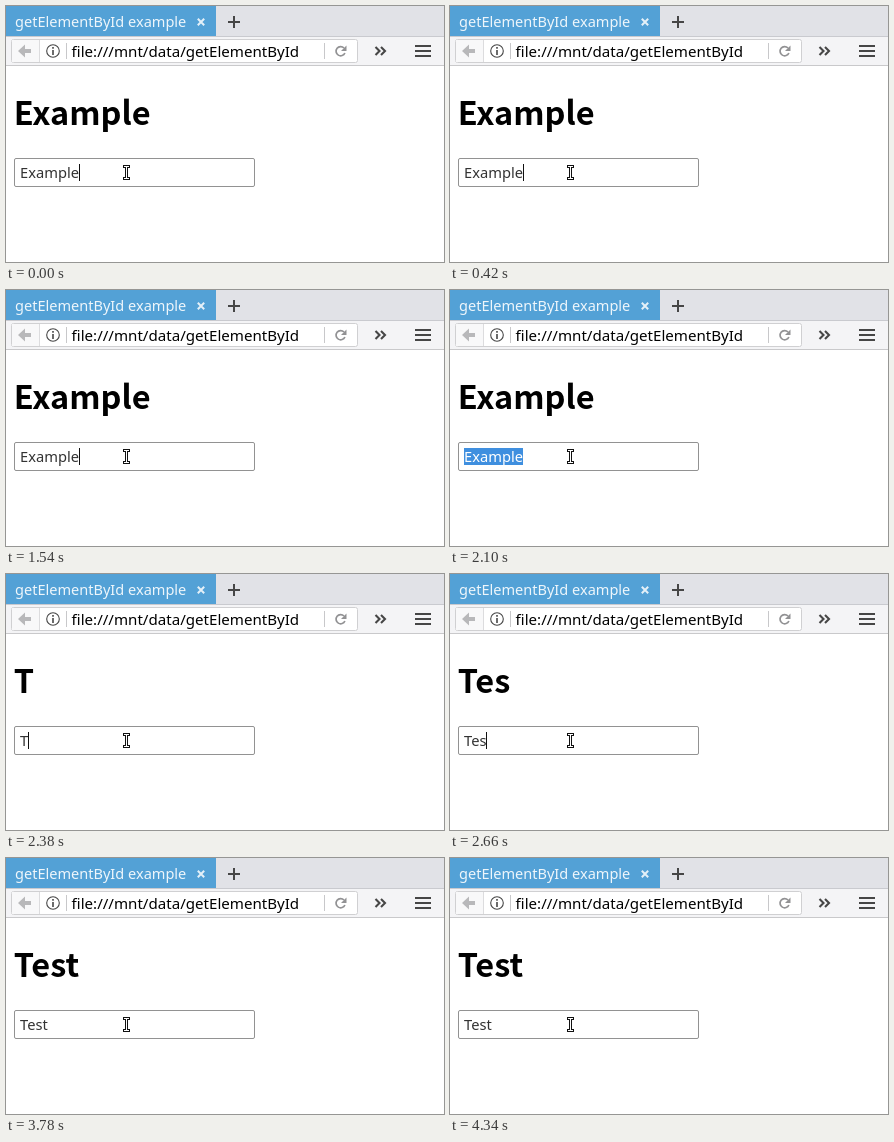
Animation of 438x256 px, one loop 4760 ms. Source, as an HTML page:

```html
<!DOCTYPE html>
<html lang="en">
<head>
<meta charset="utf-8">
<title>getElementById example</title>
<style>
  html, body { margin: 0; width: 100%; height: 100%; overflow: hidden; background: #fff; }
  svg { display: block; width: 438px; height: 256px; }
  text { font: 14.7px "Noto Sans", "Open Sans", sans-serif; white-space: pre; }
  #heading { font: bold 32.5px "Noto Sans CJK JP", "Noto Sans CJK SC", "Noto Sans", sans-serif; }
  .line { fill: none; stroke: #464646; }
</style>
</head>
<body>
<svg viewBox="0 0 438 256">
  <defs>
    <clipPath id="addressClip"><rect x="64" y="34" width="228" height="24"/></clipPath>
    <path id="beam" d="M118.5 160.5h4M120.5 160.5v12M118.5 172.5h4" stroke-linecap="square"/>
  </defs>

  <!-- Tab strip -->
  <rect width="438" height="31" fill="#e1e2e7"/>
  <rect width="210" height="30" fill="#53a1d6"/>
  <rect y="30" width="438" height="1" fill="#c9cacf"/>
  <text x="9" y="21" fill="#eef6fb" style="font-size:14.55px">getElementById example</text>
  <path class="line" d="M191.8 12.8l6.4 6.4m0-6.4l-6.4 6.4" style="stroke:#e4f0f8;stroke-width:2"/>
  <path class="line" d="M222 16h12M228 10v12" stroke-width="2"/>

  <!-- Toolbar -->
  <rect y="31" width="438" height="29" fill="#f4f4f6"/>
  <rect y="59" width="438" height="1" fill="#c9c9cb"/>
  <rect x="5.5" y="33.5" width="346" height="23" rx="2" fill="#fff" stroke="#d0d0d2"/>
  <path d="M6 34h27v22h-27z" fill="#f8f8f9"/>
  <path d="M33.5 34v22" stroke="#dcdcde"/>
  <path d="M12 45l7-6.5v4.5h6v4h-6v4.5z" fill="#b8b8ba"/>
  <circle class="line" cx="47" cy="45" r="6.3" stroke-width="1.1"/>
  <path class="line" d="M47 41v1.7M47 44v5" stroke-width="1.6"/>
  <path d="M60.5 37v16M318.5 37v16" stroke="#c8c8ca"/>
  <g clip-path="url(#addressClip)">
    <text x="65.6" y="51" style="font-size:15.1px">file:///mnt/data/getElementById_</text>
  </g>
  <path class="line" d="M338 42a4.6 4.6 0 1 0 .9 5" style="stroke:#929294;stroke-width:1.7"/>
  <path d="M340.5 39.5v5.5h-5.5z" fill="#929294"/>
  <path class="line" d="M369.5 41l4 4-4 4M375 41l4 4-4 4" stroke-width="2.1"/>
  <path class="line" d="M409 40h16M409 45h16M409 50h16" stroke-width="2"/>

  <!-- Page -->
  <text id="heading" x="7.7" y="119"></text>
  <rect x="8.5" y="152.5" width="240" height="28" rx="1.5" fill="#fff" stroke="#929292"/>
  <rect id="selection" x="14" y="158" height="17" fill="#3f8fdf"/>
  <text id="value" x="14" y="172"></text>
  <rect id="caret" y="158" width="1" height="17" fill="#111"/>
  <use href="#beam" fill="none" stroke="#111" stroke-width="3"/>
  <use href="#beam" fill="none" stroke="#fff" stroke-width="1"/>
</svg>
<script>
const LOOP = 4760, STEP = 140;
const SELECT = 1680, TYPE = 2380;
const [heading, selection, value, caret] =
  ["heading", "selection", "value", "caret"].map(id => document.getElementById(id));
const between = (t, from, to) => t >= from && t < to;

function draw(now) {
  const t = now % LOOP;
  const typed = Math.floor((t - TYPE) / STEP) + 1;
  const word = t < TYPE ? "Example" : "Test".slice(0, typed);
  const selected = between(t, SELECT, TYPE);
  const caretOff = selected || between(t, 560, 1120) || t >= 3500;

  heading.textContent = value.textContent = word;
  value.setAttribute("fill", selected ? "#fff" : "#333");
  const width = Math.floor(value.getComputedTextLength());
  selection.setAttribute("width", selected ? width : 0);
  caret.setAttribute("x", 14 + width);
  caret.setAttribute("visibility", caretOff ? "hidden" : "visible");
}

const start = performance.now();
function tick() {
  draw(performance.now() - start);
  requestAnimationFrame(tick);
}
tick();
</script>
</body>
</html>
```
